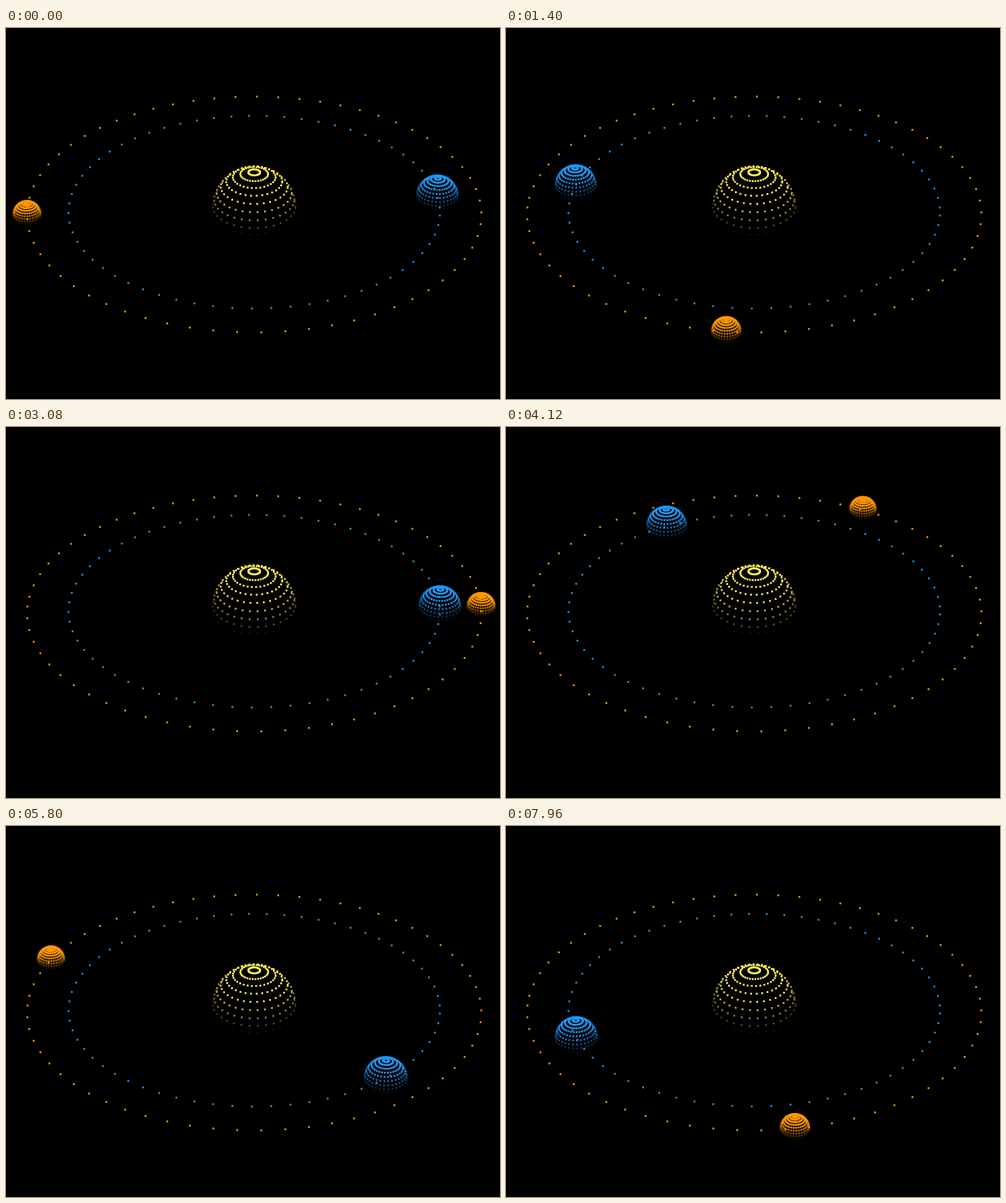
An HTML page with a canvas that plays this animation: 798x600 px, repeating every 8000 ms.

```html
<!DOCTYPE html>
<html lang="en">
<head>
<meta charset="utf-8">
<title>Dotted orbits</title>
<style>
  html, body { margin: 0; width: 100%; height: 100%; overflow: hidden; background: #000; }
  canvas { display: block; }
</style>
</head>
<body>
<canvas id="stage" width="798" height="600"></canvas>
<script>
const ctx = document.getElementById('stage').getContext('2d');
const LOOP = 8000, FRAME = 40;
const CENTER = { x: 401, y: 290.2 };
const UNIT = 66.6, CAMERA = 5216, DOT = 3;
const SIN = 0.5187, COS = Math.sqrt(1 - SIN * SIN);
const YELLOW = '#ffee58', BLUE = '#2196f3', ORANGE = '#ff9800';

// [time in ms, orbit angle in radians]
const PACE = [
  [0, 0.061], [680, 0.733], [2080, 2.1355], [4120, 4.1845],
  [5800, 5.8735], [6600, 6.668], [7960, 8.0235]
];

function angleAt(time) {
  const i = Math.max(1, PACE.findIndex(([t]) => t >= time));
  const [t0, a0] = PACE[i - 1], [t1, a1] = PACE[i];
  return a0 + (a1 - a0) * (time - t0) / (t1 - t0);
}

// x: right, h: up along the poles, z: towards the viewer in the orbit plane
function dot(x, h, z) {
  const scale = CAMERA / (CAMERA - z * COS - h * SIN);
  const px = CENTER.x + x * scale;
  const py = CENTER.y + (z * SIN - h * COS) * scale;
  ctx.fillRect(px - DOT / 2, py - DOT / 2, DOT, DOT);
}

function drawOrbit(radius, start, color) {
  ctx.fillStyle = color;
  ctx.globalAlpha = 0.93;
  for (let k = 0; k < 63; k++) {
    const a = start + k * 0.1;
    dot(radius * Math.cos(a), 0, -radius * Math.sin(a));
  }
}

function drawGlobe(cx, cz, radius, color) {
  ctx.fillStyle = color;
  for (let ring = 15; ring >= 6; ring--) {
    const polar = Math.PI - ring * 0.2;
    const h = Math.cos(polar), r = Math.sin(polar);
    for (let k = 0; k < 32; k++) {
      const x = r * Math.cos(k * 0.2), z = -r * Math.sin(k * 0.2);
      const facing = h * SIN + z * COS;
      const light = 0.17 + 1.1 * h + 0.12 * facing;
      if (facing < -0.2 || light <= 0) continue;
      ctx.globalAlpha = Math.min(1, light);
      dot(cx + radius * x, radius * h, cz + radius * z);
    }
  }
}

function drawPlanet(orbit, angle, radius, color) {
  drawGlobe(orbit * Math.cos(angle), -orbit * Math.sin(angle), radius, color);
}

function draw(time) {
  const angle = angleAt(time);
  ctx.globalAlpha = 1;
  ctx.fillStyle = '#000';
  ctx.fillRect(0, 0, 798, 600);
  drawGlobe(0, 0, UNIT, YELLOW);
  drawPlanet(UNIT * 4.5, angle * 2, UNIT / 2, BLUE);
  drawPlanet(UNIT * 5.5, Math.PI + angle, UNIT / 3, ORANGE);
  drawOrbit(UNIT * 4.5, 0, BLUE);
  drawOrbit(UNIT * 5.5, Math.PI, ORANGE);
}

function tick() {
  const time = performance.now() % LOOP;
  draw(Math.floor(time / FRAME) * FRAME);
  requestAnimationFrame(tick);
}
tick();
</script>
</body>
</html>
```
